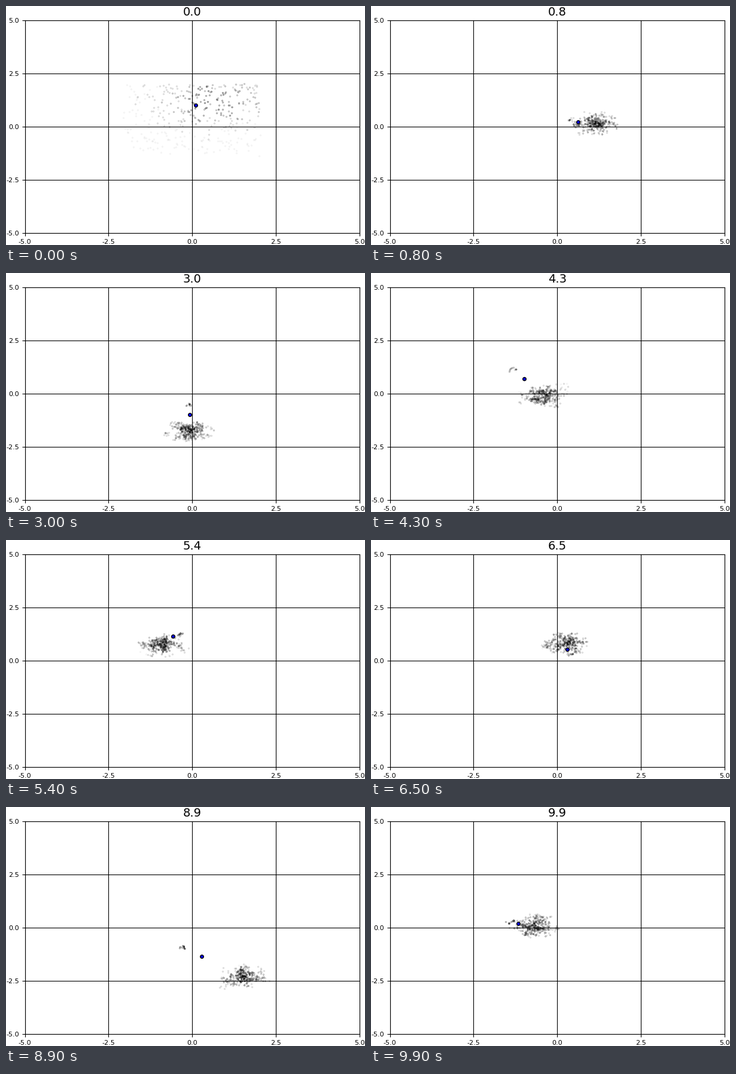
Write a matplotlib script that moves like this. It is 600 px wide and 400 px high and loops after 10000 ms.

```python
import numpy as np
import matplotlib.pyplot as plt
from matplotlib.animation import FuncAnimation

FRAMES, STEP = 100, 0.1
COUNT, STRAYS, SHADES = 360, 14, 6
SPREAD = np.array([0.28, 0.21])

plt.rcParams["font.family"] = "DejaVu Sans"

# turning points (time, x, y) of the body and of the cloud that chases it
BODY = np.array([(0, 0.10, 1.01), (1.7, 0.92, -0.51), (3.0, -0.08, -0.97),
                 (4.3, -0.99, 0.70), (6.5, 0.30, 0.52), (7.9, 1.21, -2.05),
                 (9.9, -1.17, 0.21)])
CLOUD = np.array([(0, 0.70, 1.10), (1.7, 1.25, -0.85), (3.0, -0.08, -1.70),
                  (4.3, -0.45, -0.08), (5.0, -1.00, 0.50), (6.5, 0.28, 0.85),
                  (7.9, 1.28, -1.95), (8.7, 1.75, -2.50), (9.9, -0.70, 0.08)])


def glide(keys, t):
    """Cubic Hermite curve through the rows of keys."""
    times, vals = keys[:, 0], keys[:, 1:]
    slopes = np.gradient(vals, times, axis=0)
    i = min(np.searchsorted(times, t, side="right") - 1, len(times) - 2)
    h = times[i + 1] - times[i]
    u = (t - times[i]) / h
    return ((1 + 2 * u) * (1 - u) ** 2 * vals[i]
            + u * (1 - u) ** 2 * h * slopes[i]
            + u * u * (3 - 2 * u) * vals[i + 1]
            + u * u * (u - 1) * h * slopes[i + 1])


def prior(rng, n):
    """Wide first guess, darkest near the best match."""
    x = rng.uniform(-2, 2, n)
    y = 2 - 3.3 * rng.random(n) ** 1.3
    weight = 0.16 + 0.84 * np.exp(-(x - 0.6) ** 2 / 2 - (y - 1.2) ** 2)
    points = np.column_stack([x, y]) + rng.normal(0, 0.06, (n, 2))
    return points, weight * rng.uniform(0.4, 0.9, n)


def resampled(rng, center, spread, n):
    """Children scattered closely around a few surviving parents."""
    parents = np.clip(rng.normal(size=(max(n // 4, 3), 2)), -2.3, 2.3)
    z = rng.choice(parents, n) + rng.normal(0, 0.25, (n, 2))
    weight = np.exp(-0.1 * (z ** 2).sum(axis=1))
    return center + z * spread, weight * rng.uniform(0.25, 0.75, n)


def particles(k):
    t = k * STEP
    rng = np.random.default_rng(100 + k)
    mean, target = glide(CLOUD, t), glide(BODY, t)
    wide = int(COUNT * np.exp(-t / 0.15))
    strays = min(STRAYS, COUNT - wide)
    parts = [prior(rng, wide),
             resampled(rng, mean + 1.5 * (target - mean), SPREAD / 2.5, strays),
             resampled(rng, mean, SPREAD, COUNT - wide - strays)]
    return [np.concatenate(p) for p in zip(*parts)]


fig = plt.figure(figsize=(6, 4), dpi=100, facecolor="white")
ax = fig.add_axes([31.7 / 600, 20 / 400, 559 / 600, 356 / 400])
ticks = np.linspace(-5, 5, 5)
labels = [f"{v:.1f}" for v in ticks]
ax.set(xlim=(-5, 5), ylim=(-5, 5))
ax.set_xticks(ticks, labels, fontsize=8)
ax.set_yticks(ticks, labels, fontsize=8)
ax.set_axisbelow(True)
ax.grid(color="black", linewidth=0.8)
title = ax.set_title("0.0", fontsize=14)

# one line per shade, so that markers sit on whole pixels
dust = [ax.plot([], [], "o", ms=1.44, mew=0.5, mfc="none",
                mec=(0, 0, 0, (i + 0.5) / SHADES), zorder=3)[0]
        for i in range(SHADES)]
body, = ax.plot([], [], "o", ms=4, mew=1, mfc="blue", mec="black", zorder=4)


def update(k):
    points, alpha = particles(k)
    shade = (alpha * SHADES).astype(int)
    for i, line in enumerate(dust):
        line.set_data(*points[shade == i].T)
    x, y = glide(BODY, k * STEP)
    body.set_data([x], [y])
    title.set_text(f"{k * STEP:.1f}")
    return *dust, body, title


anim = FuncAnimation(fig, update, frames=FRAMES, interval=100,
                     repeat=True, repeat_delay=0, blit=False)
plt.show()
```
